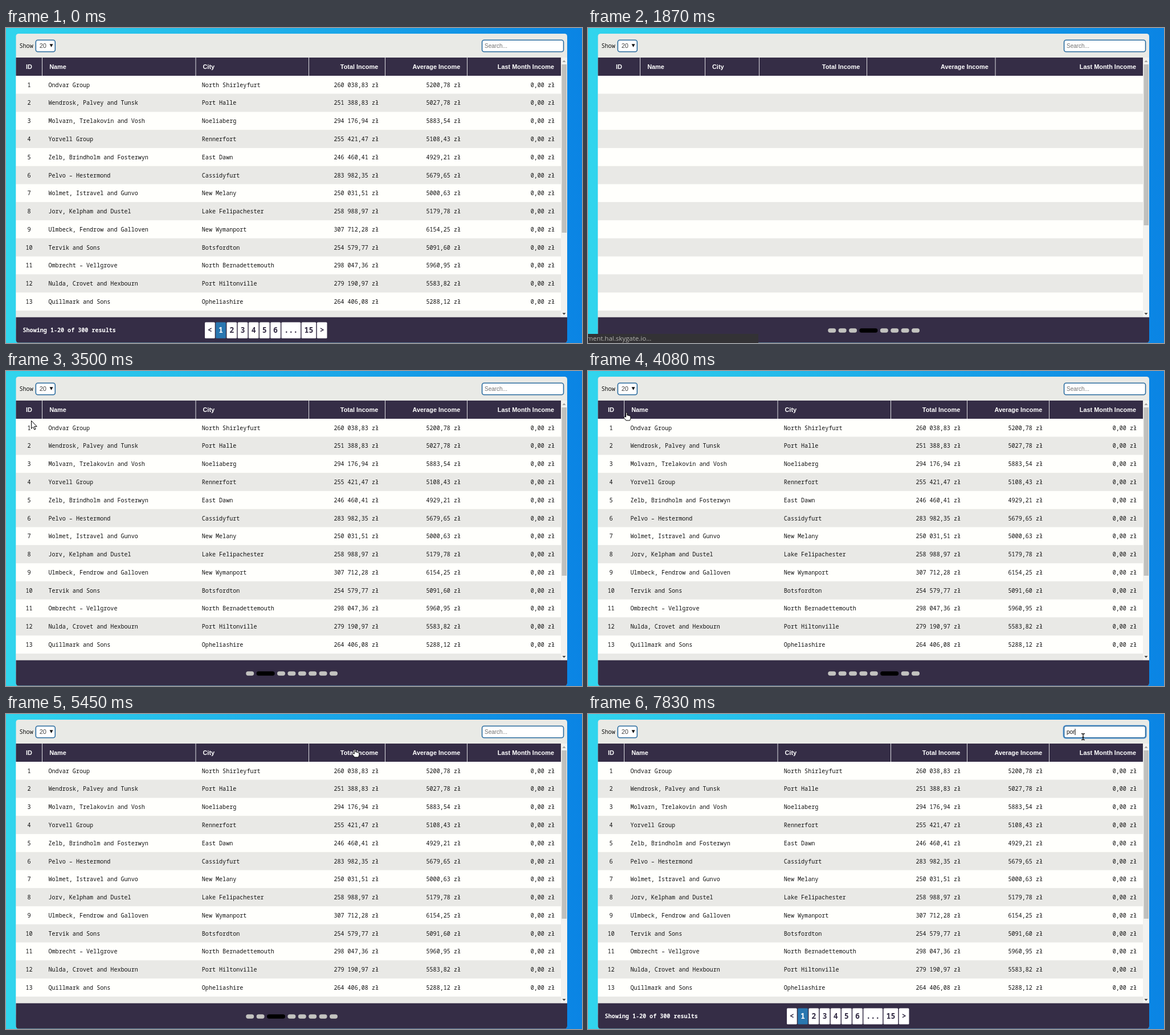
These frames come from a looping animation (1011x554 px, 8 s). An HTML page:

```html
<!DOCTYPE html>
<html lang="en">
<head>
<meta charset="utf-8">
<title>Income table</title>
<style>
html, body { margin: 0; width: 100%; height: 100%; overflow: hidden; }
svg { display: block; width: 1011px; height: 554px; }
text { font: 10.08px "Noto Sans Mono", "DejaVu Sans Mono", monospace; fill: #111; }
.head { font: bold 10.9px "Liberation Sans", Arial, sans-serif; fill: #fff; }
.form { font: 10px "Liberation Sans", Arial, sans-serif; }
.sum { font-weight: bold; fill: #fff; }
.page { font-size: 13.4px; font-weight: bold; fill: #352d46; }
.status { font: 11.5px "Open Sans", "Noto Sans", sans-serif; fill: #b4b4b0; }
.mid { text-anchor: middle; }
.end { text-anchor: end; }
.field { fill: #fff; stroke: #2b6c9f; stroke-width: 1.6; }
.cursor path { fill: #fff; stroke: #000; stroke-linejoin: round; }
</style>
</head>
<body>
<svg viewBox="0 0 1011 554">
  <defs>
    <linearGradient id="sky">
      <stop offset="0" stop-color="#31d5ed"/>
      <stop offset="1" stop-color="#0a84e4"/>
    </linearGradient>
    <clipPath id="card"><rect x="17.5" y="10" width="967.5" height="543.5" rx="4.5"/></clipPath>
  </defs>
  <rect width="1011" height="554" fill="url(#sky)"/>
  <g clip-path="url(#card)">
    <rect x="17" y="10" width="969" height="544" fill="#e9eae6"/>
    <g id="rows"></g>
    <rect x="974" y="52" width="11" height="457" fill="#f2f2ef"/>
    <rect id="thumb" x="975.5" y="64" width="8.5" fill="#c0c0bd"/>
    <path d="M976.5 60l3-3.5 3 3.5z" fill="#a0a09e"/>
    <path d="M976.5 501l3 3.5 3-3.5z" fill="#444"/>
    <rect x="17" y="52" width="957" height="32" fill="#352d46"/>
    <rect x="17" y="508.7" width="969" height="46" fill="#352d46"/>
  </g>
  <text x="23.5" y="34.7">Show</text>
  <rect class="field" x="52.3" y="21.3" width="34" height="20.4" rx="3.5"/>
  <text class="form" x="58.7" y="35" style="font-size:11px;fill:#444">20</text>
  <path d="M76.5 28.3h6l-3 5.4z" fill="#111"/>
  <rect id="glow" x="835.3" y="21.3" width="143.6" height="20.6" rx="3.5" fill="none" stroke="#5b9bd8" stroke-width="3.4"/>
  <rect class="field" x="835.6" y="21.3" width="143" height="20.4" rx="3.5"/>
  <text class="form" id="query" x="840" y="35"></text>
  <rect id="caret" y="26" width="1" height="11"/>
  <g id="fullHead"></g>
  <g id="emptyHead"></g>
  <g id="data"></g>
  <g id="pager"></g>
  <g id="loader"></g>
  <g id="status">
    <rect y="538" width="299" height="16" fill="#333235"/>
    <text class="status" x="-2" y="550">ment.hal.skygate.io…</text>
  </g>
  <g id="arrow" class="cursor"><path d="M.5 .5V14.3L3.7 11.3 5.8 16.2 8 15.2 5.9 10.5H10.2Z"/></g>
  <g id="hand" class="cursor"><path d="M-1.5 8V1.2Q-1.5 0-.4 0T.8 1.2V5Q2 4.2 3 5.4 4.2 4.8 5 6 6.6 5.6 6.8 7.2V10.5L5.5 14H-1.2L-5 9.3Q-5.2 7.6-3.8 7.3Z"/></g>
  <g id="beam"><path d="M-3-5.5Q0-5.5 0-4Q0-5.5 3-5.5M0-4.5V4.5M-3 5.5Q0 5.5 0 4Q0 5.5 3 5.5M-1.5 1H1.5" fill="none" stroke="#111" stroke-width="1.3"/></g>
</svg>
<script>
const $ = id => document.getElementById(id);
const text = (x, y, s, cls = '') => `<text x="${x}" y="${y}" class="${cls}">${s}</text>`;
const rect = (x, y, w, h, fill, rx = 0) =>
  `<rect x="${x}" y="${y}" width="${w}" height="${h}" fill="${fill}" rx="${rx}"/>`;
const show = (id, on) => { $(id).style.display = on ? '' : 'none'; };

const table = [
  ['Ondvar Group', 'North Shirleyfurt', 260038.83],
  ['Wendrosk, Palvey and Tunsk', 'Port Halle', 251388.83],
  ['Molvarn, Trelakovin and Vosh', 'Noeliaberg', 294176.94],
  ['Yorvell Group', 'Rennerfort', 255421.47],
  ['Zelb, Brindholm and Fosterwyn', 'East Dawn', 246460.41],
  ['Pelvo – Hestermond', 'Cassidyfurt', 283982.35],
  ['Wolmet, Istravel and Gunvo', 'New Melany', 250031.51],
  ['Jorv, Kelpham and Dustel', 'Lake Felipachester', 258988.97],
  ['Ulmbeck, Fendrow and Galloven', 'New Wymanport', 307712.28],
  ['Tervik and Sons', 'Botsfordton', 254579.77],
  ['Ombrecht – Vellgrove', 'North Bernadettemouth', 298047.36],
  ['Nulda, Crovet and Hexbourn', 'Port Hiltonville', 279190.97],
  ['Quillmark and Sons', 'Opheliashire', 264406.08]
];
const rowH = 31.77;
const money = v => v.toFixed(2).replace('.', ',') + ' zł';
const grouped = v => money(v).replace(/^(\d{3})(\d{3})/, '$1 $2');

$('data').innerHTML = table.map(([name, city, total], i) => {
  const y = 103.7 + i * rowH;
  return text(40.5, y, i + 1, 'mid') + text(74.5, y, name) + text(343.8, y, city) +
    text(654, y, grouped(total), 'end') + text(798, y, money(total / 50), 'end') +
    text(963, y, money(0), 'end');
}).join('');

for (let i = 0; i < 14; i++)
  $('rows').innerHTML += rect(17, 84 + i * rowH, 968, rowH, i % 2 ? '#e9e9e6' : '#fffffc');

// Columns are given by the separators between them.
function header(id, seps) {
  const [a, b, c, d, e] = seps;
  const cells = [[(17.5 + a) / 2, 'ID', 'mid'], [a + 12.7, 'Name', ''], [b + 12.5, 'City', ''],
    [d - 12.3, 'Total Income', 'end'], [e - 12.3, 'Average Income', 'end'],
    [962, 'Last Month Income', 'end']];
  $(id).innerHTML = seps.map(x => rect(x - .5, 52, 1, 32, '#deddE2')).join('') +
    cells.map(([x, s, cls]) => text(x, 72, s, 'head ' + cls)).join('');
}
header('fullHead', [63.5, 333, 531.5, 665.5, 809.5]);
header('emptyHead', [91.5, 205.5, 300.5, 489.5, 715]);

let left = 349;
$('pager').innerHTML = text(29.5, 535.4, 'Showing 1-20 of 300 results', 'sum') +
  ['&lt;', '1', '2', '3', '4', '5', '6', '...', '15', '&gt;'].map(s => {
    const w = 8 * (s[0] === '&' ? 1 : s.length) + 9.7, x = left, on = s === '1';
    left += w + 1.5;
    return rect(x, 517.5, w, 28.3, on ? '#2a77b0' : '#fff', 1.5) +
      `<g${on ? ' style="--c:#fff"' : ''}>` +
      `<text class="page mid" x="${x + w / 2}" y="536"${on ? ' style="fill:#fff"' : ''}>${s}</text></g>`;
  }).join('');

$('loader').innerHTML = rect(0, 528.3, 14, 7.5, '#c3c3c0', 3.7).repeat(8);
const pills = [...$('loader').children];

// [time, active pill]
const beats = [[1870, 3], [2200, 4], [2270, 5], [2340, 6], [2410, 7], [2580, 3], [2660, 2],
  [2750, 1], [3000, 0], [3400, 1], [3700, 2], [3830, 3], [3950, 4], [4080, 5], [4200, 6],
  [4310, 7], [4420, 6], [4530, 5], [4620, 4], [4830, 3], [4950, 2], [5060, 1], [5170, 0],
  [5280, 1], [5400, 2]];

// [time, x, y] of the pointer's hot spot
const trail = [[500, 30, 99], [600, 3, 88], [2200, 12, 85], [2410, 28, 89], [3000, 28, 89],
  [3790, 54, 86], [4080, 68, 73], [4120, 68, 73], [4620, 54, 76], [4700, 54, 76],
  [4950, 109, 65], [5040, 109, 65], [5200, 300, 36], [5450, 612, 62], [5540, 740, 62],
  [5790, 860, 56], [5950, 860, 56], [6080, 867, 44], [6160, 867, 44], [6200, 869, 40],
  [8001, 869, 40]];

function pointer(t) {
  const i = Math.max(1, trail.findIndex(p => p[0] > t));
  const [t0, x0, y0] = trail[i - 1], [t1, x1, y1] = trail[i];
  const k = Math.min(1, Math.max(0, (t - t0) / (t1 - t0)));
  return [x0 + (x1 - x0) * k, y0 + (y1 - y0) * k];
}

function draw(t) {
  const empty = t >= 1870 && t < 2580, loading = t >= 1870 && t < 5540;
  show('data', !empty);
  show('fullHead', !empty);
  show('emptyHead', empty);
  show('pager', !loading);
  show('loader', loading);
  show('status', t >= 1120 && t < 2700);
  $('thumb').setAttribute('height', empty ? 283 : 296);

  if (loading) {
    const active = beats.filter(b => b[0] <= t).pop()[1];
    pills.forEach((p, i) => {
      p.setAttribute('x', 421.2 + i * 18.4 + (i > active ? 18 : 0));
      p.setAttribute('width', i === active ? 32 : 14);
      p.setAttribute('fill', i === active ? '#000' : '#c3c3c0');
    });
  }

  const typed = t < 7450 ? 0 : t < 7750 ? 1 : t < 7830 ? 2 : 3;
  $('query').textContent = typed ? 'por'.slice(0, typed) : 'Search...';
  $('query').style.fill = typed ? '#111' : '#757575';
  show('glow', t >= 6450);
  show('caret', t >= 6450 && (t < 7040 || typed));
  $('caret').setAttribute('x', 840 + [0, 5.6, 11.1, 14.5][typed]);

  const [x, y] = pointer(t), visible = t >= 500 && t < 700 || t >= 2200;
  const kind = y >= 52 && y < 84 ? 'hand' : x > 834 && y < 42 ? 'beam' : 'arrow';
  for (const id of ['arrow', 'hand', 'beam']) {
    show(id, visible && id === kind);
    $(id).setAttribute('transform', `translate(${Math.round(x)} ${Math.round(y)})`);
  }
}

const start = performance.now();
function tick() {
  draw((performance.now() - start) % 8000);
  requestAnimationFrame(tick);
}
tick();
</script>
</body>
</html>
```
